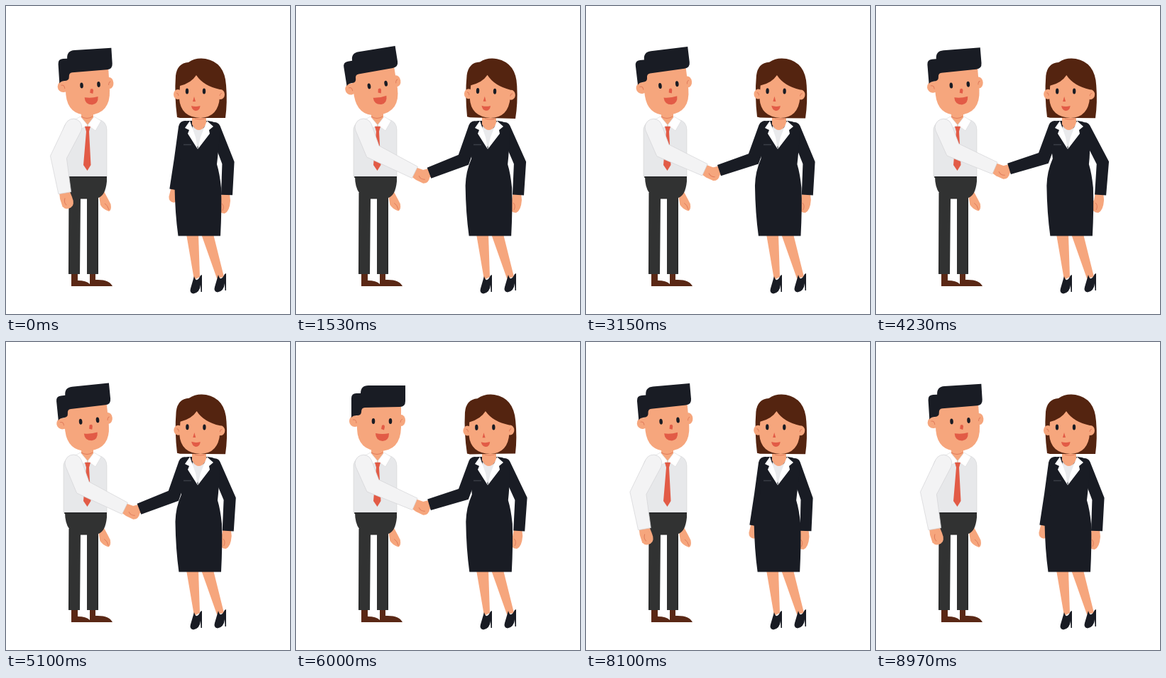
Write an HTML page that moves like this. It is 400 px wide and 432 px high and loops after 9 s.

```html
<!DOCTYPE html>
<html lang="en">
<head>
<meta charset="utf-8">
<title>Handshake</title>
<style>
html, body { margin: 0; width: 100%; height: 100%; overflow: hidden; background: #fff; }
svg { display: block; width: 400px; height: 432px; }
.skin { fill: #f6a67d; }
.dark { fill: #191c24; }
.hair { fill: #542410; }
.red { fill: #e25b46; }
.brown { fill: #5a2815; }
.white { fill: #fff; stroke: #d9d9db; stroke-width: .6; }
.sleeve { fill: #f3f3f4; stroke: #d3d3d6; stroke-width: .7; }
.crease { fill: none; stroke: #e07c5c; stroke-width: 1; }
</style>
</head>
<body>
<svg viewBox="0 0 400 432">
  <!-- woman -->
  <g class="skin">
    <path d="M254 320H271L273 380L265 384Z"/>
    <path d="M275 320H292L307 380L297 382Z"/>
  </g>
  <path id="shoe" class="dark" d="M265 379Q268 390 274 378L276 377V401H274.500L274 391Q273 402 264 403.500Q258 402.500 260 396Z"/>
  <use href="#shoe" x="34" y="-2"/>
  <g id="wHand" class="skin"><path d="M-3-6H6Q16-7 18-1Q18 6 11 7L-3 6Z"/></g>
  <path id="wSleeve" class="dark"/>
  <g id="wFree" class="skin"><path d="M304 262L315 263L316 273Q315 288 308 291Q300 291 299 283Q298 277 302 273Z"/><path class="crease" d="M304 277Q308 281 305 287"/></g>
  <path id="wArm" class="dark"/>
  <path id="wBody" class="dark"/>
  <path class="skin" d="M262 146H282V166L271 180L262 166Z"/>
  <path d="M263 168Q271 180 281 168L283 178L270 198L260 180Z" fill="#e9eaec"/>
  <path d="M259 161L252 171L258 174L256 179L270 201L267 184Z M283 161L292 169L286 174L287 179L270 201L274 184Z" fill="#fff"/>
  <path d="M250 194.500H261" stroke="#3a3e47" stroke-width="1.500"/>
  <g id="wHead">
    <path class="hair" d="M241 156Q237 126 239 98Q241 80 257 79Q267 72 281 74Q308 79 310 111Q312 135 309 157H282L245 157Z"/>
    <ellipse class="skin" cx="242" cy="124" rx="6" ry="7"/>
    <ellipse class="skin" cx="302" cy="124" rx="6" ry="7"/>
    <path class="skin" d="M245 112Q261 108 268 97Q278 112 301 117V128Q299 156 274 157Q246 156 244 130Z"/>
    <path class="crease" d="M240 122Q243 122 243 126M304 122Q301 123 301 126M266 158Q273 160 280 158"/>
    <ellipse class="dark" cx="255" cy="119.500" rx="2.200" ry="4"/>
    <ellipse class="dark" cx="279" cy="119.500" rx="2.200" ry="4"/>
    <path class="red" d="M265 127L267 134H263Z M261 140Q267 142 273.500 140Q273 147 267 147Q262 146 261 140Z"/>
  </g>

  <!-- man -->
  <g id="mFree"><path class="skin" d="M130 261L138 260Q144 271 147.500 278Q149 286 145 288Q136 285 133 279Z"/><path class="crease" d="M139 277Q143 279 145 286"/></g>
  <path class="brown" d="M92 374H101V385Q113 385 118 390V393H92Z M118 374H126V384Q145 383 150 393H118Z"/>
  <path d="M83 238H142V246Q140 266 130 269V376H114V270H105L104 376H88L89 262Q83 254 83 238Z" fill="#313232"/>
  <path d="M114 270H105M89 262V374M129 272V374" stroke="#242525" fill="none"/>
  <path d="M96 159Q83 162 81 172V239H142V174Q142 162 130 159Z" fill="#e7e8ea" stroke="#d3d3d6" stroke-width=".6"/>
  <path d="M82 240H142" stroke="#202122" stroke-width="1.500"/>
  <path class="skin" d="M106 142H123V160L115 169L106 160Z"/>
  <path class="white" d="M105 155L94 161L102 175L115 167Z M124 155L134 161L126 175L115 167Z"/>
  <path class="red" d="M111 169H119L117 176L119.500 223L114.500 231L109 223L113 176Z"/>
  <g id="mHead">
    <circle class="skin" cx="83" cy="111" r="8"/>
    <ellipse class="skin" cx="148" cy="110" rx="6" ry="8"/>
    <path class="skin" d="M86 86H148V120Q147 153 117 153Q87 152 86 122Z"/>
    <path class="crease" d="M80 109Q85 108 85 114M150 108Q147 109 147 113"/>
    <path class="dark" d="M78 106V79Q78 72 85 72H91Q91 61 102 61H154V83Q154 91 146 91L97 92Q92 92 92 98Q92 103 86 103Q80 103 78 106Z"/>
    <ellipse class="dark" cx="109" cy="111" rx="2.300" ry="4"/>
    <ellipse class="dark" cx="133" cy="111" rx="2.300" ry="4"/>
    <path class="red" d="M121 117Q125 115 125 119L124 123.500L120 122Z M112 128Q122 130 131 128Q131 138.500 122 139Q112 138 112 128Z"/>
  </g>
  <path class="crease" d="M106 155Q114 160 122 155"/>
  <g id="mHand"><path class="skin" d="M-4-7L8-8Q20-9 22-2Q24 6 17 9L6 9L-4 7Z"/><path class="crease" d="M7 2Q12 6 17 3"/></g>
  <path id="mSleeve" class="sleeve"/>
</svg>
<script>
const LOOP = 9000, STEP = 30, RAD = Math.PI / 180;
const el = id => document.getElementById(id);

// [time, value] tables
const tilt = [[0, -3.6], [450, -7], [930, -10.5], [1530, -9], [1890, -4.5], [2350, -1.5],
  [2950, -8.3], [3150, -6.8], [3700, -3], [4230, -4.6], [4600, -6.5], [5000, -6], [5610, -2.5],
  [6000, 0], [6300, 0], [6750, -4.5], [7230, 1.3], [8100, -5], [8500, -5], [9000, -3.6]];
const sway = [[0, 0], [700, 3], [1100, 5], [1530, 2.5], [2300, 4], [2900, 3.5], [3150, 1],
  [3700, 4], [4300, 6.5], [4700, 4], [5400, 1], [6000, 4], [6600, 3], [7230, -1], [8000, -2], [9000, 0]];
const reach = [[0, 0], [180, 0], [330, -.1], [900, 1], [6540, 1], [7050, 0], [9000, 0]];

// shoulder, then [angle, length] of upper arm and forearm at rest and in the handshake
const manArm = { at: [95, 170], rest: [[116.6, 47], [80, 51]], shake: [[67.6, 35], [24.6, 65]], w: [12, 11, 9] };
const womanArm = { at: [252, 170], rest: [[97.8, 44], [100, 45]], shake: [[110, 47], [161.6, 51]], w: [9, 9, 8] };

const mix = (a, b, k) => a + (b - a) * k;

function valueAt(keys, t) {
  const i = keys.findIndex(k => k[0] > t);
  const [t0, a] = keys[i - 1], [t1, b] = keys[i];
  const k = (t - t0) / (t1 - t0);
  return mix(a, b, k * k * (3 - 2 * k));
}

// tapered, mitred outline around three joints with a rounded shoulder
function limb(p, w) {
  const ang = i => Math.atan2(p[i + 1][1] - p[i][1], p[i + 1][0] - p[i][0]);
  const a = ang(0), b = ang(1), turn = Math.atan2(Math.sin(b - a), Math.cos(b - a));
  const dirs = [a, a + turn / 2, b];
  const side = s => p.map(([x, y], i) => {
    const r = s * w[i] / (i === 1 ? Math.cos(turn / 2) : 1);
    return [x - Math.sin(dirs[i]) * r, y + Math.cos(dirs[i]) * r].map(v => v.toFixed(2)).join(' ');
  });
  const l = side(1), r = side(-1);
  return `M${l.join('L')}L${r.reverse().join('L')}A${w[0]} ${w[0]} 0 0 0 ${l[0]}Z`;
}

function poseArm(name, arm, k, dx, dy) {
  const seg = i => [0, 1].map(j => mix(arm.rest[i][j], arm.shake[i][j], k));
  const go = ([x, y], [deg, len]) => [x + Math.cos(deg * RAD) * len, y + Math.sin(deg * RAD) * len];
  const elbow = go(arm.at, seg(0)), wrist = go(elbow, seg(1));
  elbow[0] += dx;
  elbow[1] += dy * .4;
  wrist[0] += dx * .6;
  wrist[1] += dy;
  el(name + 'Sleeve').setAttribute('d', limb([arm.at, elbow, wrist], arm.w));
  const turn = seg(1)[0] - (name === 'm' ? 8 * (1 - k) : 0);
  el(name + 'Hand').setAttribute('transform', `translate(${wrist}) rotate(${turn})`);
}

function womanBody(s) {
  const x = v => (v + s * .45).toFixed(2);
  return `M256 161L249 163Q244 166 244 176Q247 196 ${x(246)} 214Q${x(238)} 232 ${x(237.5)} 252` +
    `Q${x(238)} 290 ${x(242.5)} 322.500H${x(302)}Q${x(304)} 285 ${x(303)} 255Q${x(301)} 235 ${x(297)} 222` +
    `Q${x(299)} 205 301 180Q300 164 290 162L284 161Z`;
}

function draw(t) {
  const a = valueAt(tilt, t), s = valueAt(sway, t), k = valueAt(reach, t);
  const pump = 1 + 3 * Math.cos((t - 1530) / 596 * 2 * Math.PI);
  const up = Math.max(0, k);

  el('mHead').setAttribute('transform', `rotate(${a} 115 150)`);
  el('wHead').setAttribute('transform', `rotate(${-(a + 3.6) * .28} 274 158)`);
  el('mFree').setAttribute('transform', `translate(${-up * .7} ${-up * .5})`);

  poseArm('m', manArm, k, (a + 3.6) * .4 * (1 - up), pump * up);
  poseArm('w', womanArm, k, 0, pump * up);

  el('wBody').setAttribute('d', womanBody(s));
  el('wArm').setAttribute('d', limb([[294, 171], [313 + s, 220], [311 + s * .8, 265]], [8, 8.5, 8]));
  el('wFree').setAttribute('transform', `translate(${s * .8} ${-up})`);
}

function frame() {
  draw(Math.floor(performance.now() % LOOP / STEP) * STEP);
  requestAnimationFrame(frame);
}
frame();
</script>
</body>
</html>
```
